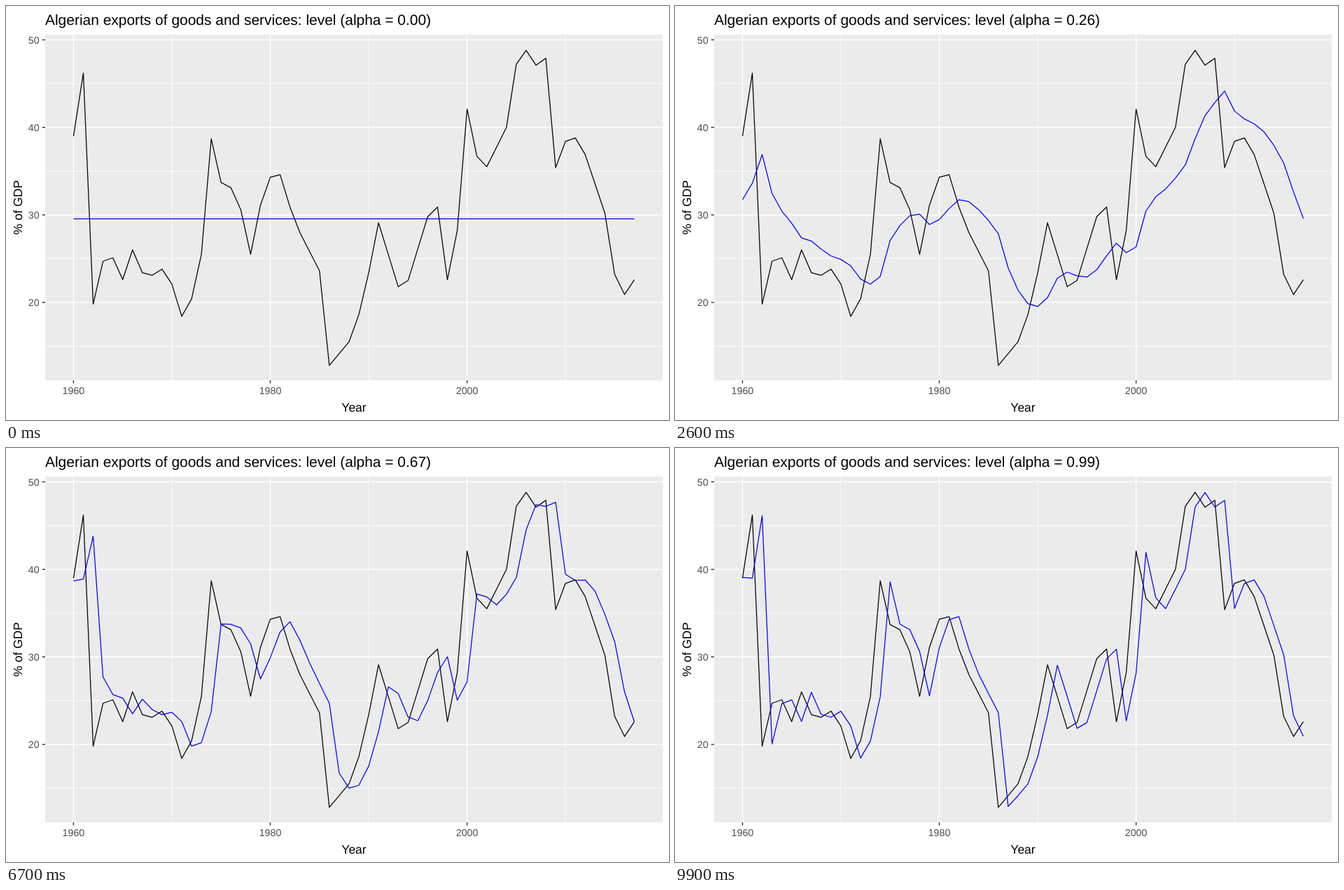
An HTML page for the animation above (10 s loop, 947 by 592 pixels).

```html
<!DOCTYPE html>
<html lang="en">
<head>
<meta charset="utf-8">
<style>
  html, body { margin: 0; width: 100%; height: 100%; overflow: hidden; background: #fff; }
  svg { display: block; }
  text { font: 17.5px "Liberation Sans", Arial, sans-serif; text-rendering: geometricPrecision; }
  #title { font-size: 20.94px; }
  .tick { font-size: 14.2px; fill: #4d4d4d; }
  .major { stroke: #fff; stroke-width: 1.5; }
  .minor { stroke: #fff; stroke-width: .8; }
  .mark { stroke: #333; stroke-width: 1.4; }
  polyline { fill: none; stroke-width: 1.25; stroke-linejoin: round; }
</style>
</head>
<body>
<svg width="947" height="592" viewBox="0 0 947 592">
  <rect x="56" y="40.7" width="882" height="494.5" fill="#ebebeb"/>
  <g id="axes"></g>
  <polyline id="data" stroke="#000"/>
  <polyline id="fit" stroke="#00f"/>
  <text id="title" x="56" y="26.7"></text>
  <text x="497" y="580" text-anchor="middle">Year</text>
  <text transform="translate(22.8 288) rotate(-90)" text-anchor="middle">% of GDP</text>
</svg>
<script>
const firstYear = 1960;

// Percent of GDP at the turning points, one slot per year; gaps lie on straight lines
const turns = [
  39, 46.2, 19.8, 24.7, 25.1, 22.6, 26, 23.4, 23.1, 23.8,
  22.1, 18.4, 20.4, 25.5, 38.7, 33.7, 33.1, 30.6, 25.5, 31.1,
  34.3, 34.6, 30.9, 28, , 23.6, 12.8, , 15.5, 18.6,
  23.4, 29.1, , 21.8, 22.5, , 29.8, 30.9, 22.6, 28.2,
  42.1, 36.7, 35.5, , 40, 47.2, 48.8, 47.1, 47.9, 35.4,
  38.4, 38.8, 36.9, , 30.2, 23.2, 20.9, 22.6];

function fillGaps(list) {
  const filled = [];
  for (let i = 0; i < list.length; i++) {
    let next = i;
    while (!(next in list)) next++;
    const before = filled[i - 1] ?? list[next];
    filled.push(before + (list[next] - before) / (next - i + 1));
    if (next === i) filled[i] = list[i];
  }
  return filled;
}

const series = fillGaps(turns);

const byId = id => document.getElementById(id);
const xOf = year => 96.4 + (year - firstYear) * 14.055;
const yOf = value => 48.4 + (50 - value) * 12.515;
const points = values =>
  values.map((v, i) => `${xOf(firstYear + i).toFixed(2)},${yOf(v).toFixed(2)}`).join(' ');

const line = (kind, x1, y1, x2, y2) =>
  `<line class="${kind}" x1="${x1}" y1="${y1}" x2="${x2}" y2="${y2}"/>`;
const label = (x, y, anchor, text) =>
  `<text class="tick" x="${x}" y="${y}" text-anchor="${anchor}">${text}</text>`;
const across = (kind, y) => line(kind, 56, y, 938, y);
const down = (kind, x) => line(kind, x, 40.7, x, 535.2);

function drawAxes() {
  let minor = '', major = '';
  for (let v = 15; v <= 50; v += 5) {
    const y = yOf(v);
    if (v % 10) minor += across('minor', y);
    else major += across('major', y) + line('mark', 51.6, y, 56, y) + label(47.6, y + 5.2, 'end', v);
  }
  for (let year = firstYear; year <= 2010; year += 10) {
    const x = xOf(year);
    if (year % 20) minor += down('minor', x);
    else major += down('major', x) + line('mark', x, 535.2, x, 539.6) + label(x, 555.4, 'middle', year);
  }
  byId('axes').innerHTML = minor + major;
}

// One-step forecasts of simple exponential smoothing
function smooth(alpha, level) {
  return series.map(v => {
    const forecast = level;
    level += alpha * (v - level);
    return forecast;
  });
}

// The starting level minimises the squared forecast errors
function startLevel(alpha) {
  let top = 0, bottom = 0, weight = 1;
  smooth(alpha, 0).forEach((forecast, i) => {
    top += weight * (series[i] - forecast);
    bottom += weight * weight;
    weight *= 1 - alpha;
  });
  return top / bottom;
}

let shown = -1;
function frame() {
  const step = Math.floor(performance.now() / 100) % 100;
  if (step !== shown) {
    shown = step;
    const alpha = step / 100;
    byId('title').textContent =
      `Algerian exports of goods and services: level (alpha = ${alpha.toFixed(2)})`;
    byId('fit').setAttribute('points', points(smooth(alpha, startLevel(alpha))));
  }
  requestAnimationFrame(frame);
}

drawAxes();
byId('data').setAttribute('points', points(series));
frame();
</script>
</body>
</html>
```
